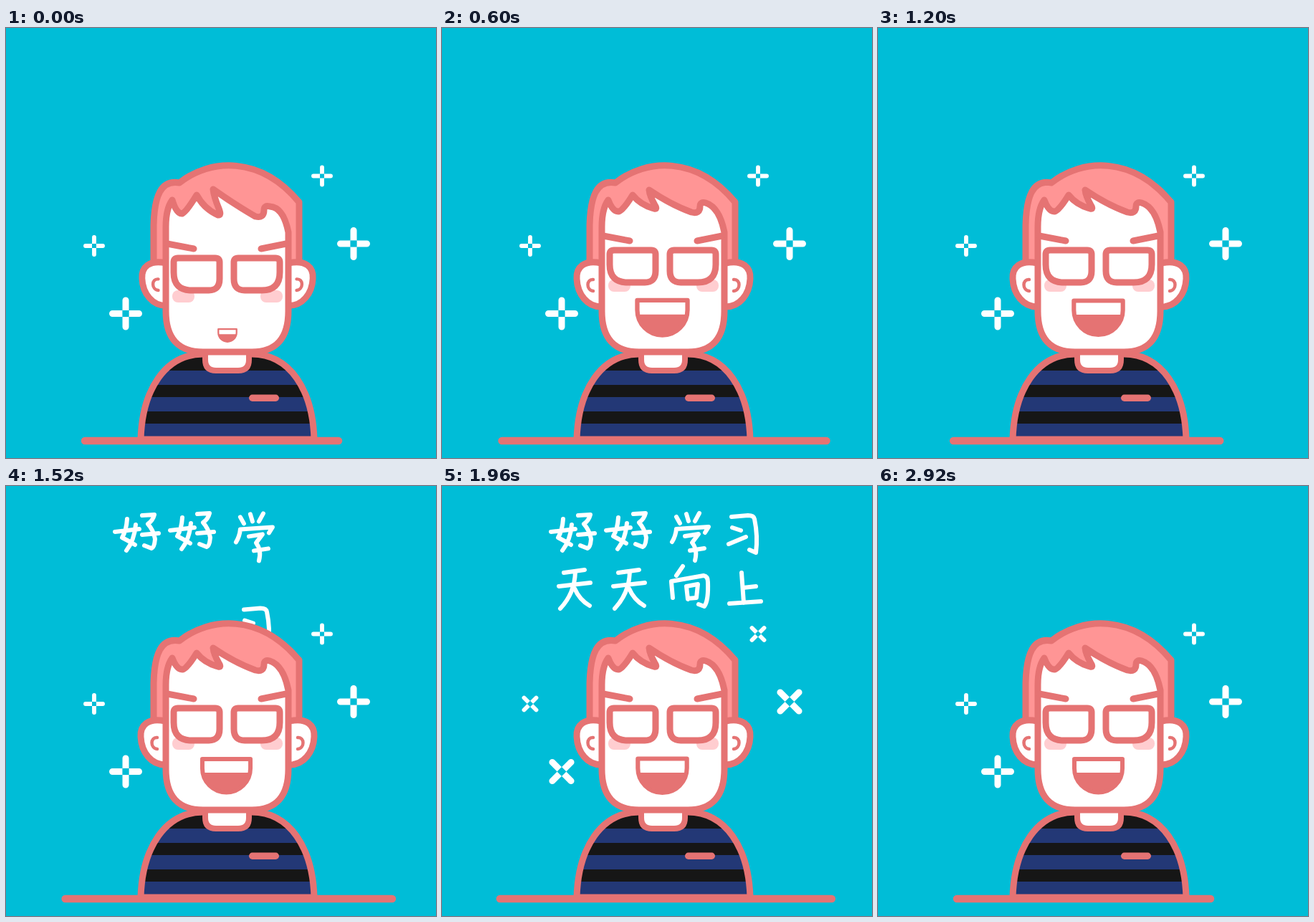
Animation, 600 px wide and 600 px high, one loop 2960 ms. Source, as an HTML page:

```html
<!DOCTYPE html>
<html lang="zh">
<head>
<meta charset="utf-8">
<title>好好学习 天天向上</title>
<style>
  html, body { margin: 0; width: 100%; height: 100%; overflow: hidden; background: #00bdd7; }
  svg { display: block; width: 100vw; height: 100vh; }
  .line { fill: none; stroke: #e57373; stroke-width: 9; stroke-linecap: round; stroke-linejoin: round; }
  .white { fill: #fff; }
  .hair { fill: #ff9595; }
  .ink { fill: none; stroke: #fff; stroke-width: 6; stroke-linecap: round; stroke-linejoin: round; }
  .ha { fill: #fff; font: 600 46px "Open Sans", sans-serif; text-anchor: middle; }
</style>
</head>
<body>
<svg viewBox="0 0 600 600">
  <defs>
    <path id="torso" d="M188 574C190 505 222 455 275 455H343C396 455 428 505 430 574Z"/>
    <clipPath id="torsoClip"><use href="#torso"/></clipPath>
    <path id="lens" d="M240 310H292Q298 310 298 316V339Q298 355 283 355H259Q234 355 234 330V316Q234 310 240 310Z"/>
    <clipPath id="lensClip"><use href="#lens"/><use href="#lens" transform="matrix(-1 0 0 1 616 0)"/></clipPath>
    <g id="spark">
      <path class="ink" style="stroke-width:9" d="M-18.5 0H18.5M0-18.5V18.5"/>
      <rect x="-4.6" y="-4.6" width="9.2" height="9.2" fill="#00bdd7"/>
    </g>
    <g id="ear">
      <path class="line white" d="M222 328C198 323 187 334 188 350C189 372 203 389 222 389"/>
      <path class="line" style="stroke-width:4.5" d="M211 351C201 350 201 366 211 367"/>
    </g>
  </defs>

  <g id="sparks"></g>
  <g id="words" role="img" aria-label="好好学习 天天向上"></g>
  <g id="laughs"></g>

  <g clip-path="url(#torsoClip)">
    <rect x="180" y="450" width="260" height="130" fill="#161616"/>
    <path fill="#233876" d="M180 478H440V498H180ZM180 515H440V535H180ZM180 552H440V580H180Z"/>
  </g>
  <use href="#torso" class="line"/>
  <rect x="339" y="511.5" width="42" height="9.5" rx="4.7" fill="#e57373"/>
  <path class="line white" style="stroke-width:8" d="M278 454V463Q278 478 293 478H324Q339 478 339 463V454"/>

  <path class="line hair" d="M206 326V275C207 235 216 211 242 216C285 182 355 178 409 243V326"/>
  <g id="ears"><use href="#ear"/><use href="#ear" transform="matrix(-1 0 0 1 618 0)"/></g>
  <path id="face" class="line white"/>
  <g id="blush" fill="#ffcdd0">
    <rect x="232" y="351" width="31" height="17" rx="8"/>
    <rect x="355" y="351" width="31" height="17" rx="8"/>
  </g>
  <g id="glasses">
    <path class="line" d="M225 290L262 297M356 297L391 290"/>
    <use href="#lens" class="white"/>
    <use href="#lens" class="white" transform="matrix(-1 0 0 1 616 0)"/>
    <path id="glare" class="line" style="stroke-width:4" clip-path="none"/>
    <use href="#lens" class="line"/>
    <use href="#lens" class="line" transform="matrix(-1 0 0 1 616 0)"/>
  </g>
  <g id="mouth">
    <path class="white" d="M274 381H341V394A33.5 33.5 0 0 1 274 394Z"/>
    <path fill="#e57373" d="M274 400H341A33.5 27.5 0 0 1 274 400Z"/>
    <path class="line" style="stroke-width:6" d="M274 381H341V394A33.5 33.5 0 0 1 274 394Z"/>
  </g>
  <path id="table" class="line" style="stroke-width:10.5"/>
</svg>
<script>
const LOOP = 2960, STEP = 40;
const $ = id => document.getElementById(id);
const set = (el, name, value) => el.setAttribute(name, value);
const move = (el, value) => set(el, 'transform', value);
const clamp = v => Math.min(1, Math.max(0, v));
const span = (t, from, to) => clamp((t - from) / (to - from));
const sine = p => (1 - Math.cos(Math.PI * p)) / 2;
const cubic = p => p < .5 ? 4 * p ** 3 : 1 - 4 * (1 - p) ** 3;

function add(parent, tag, attrs) {
  const el = document.createElementNS('http://www.w3.org/2000/svg', tag);
  for (const name in attrs) set(el, name, attrs[name]);
  return $(parent).appendChild(el);
}

// Brush strokes of each character, the centre it settles on, and an offset for repeats
const hao = 'M169 46Q168 62 162 72Q170 76 180 82M181 54Q179 76 168 90M152 64L186 60M190 41L207 40Q205 48 198 53Q206 62 208 74Q207 86 203 87L193 83M190 68L213 66';
const tian = 'M170 121L199 117M163 140L207 135M186 120Q185 150 165 171M185 143Q192 159 206 167';
const words = [
  [hao, 182, 64],
  [hao, 259, 62, 77, -2],
  ['M327 43L332 52M341 39L344 49M359 38L353 49M327 60Q326 70 321 78M327 60L372 57L367 65M339 70L358 67L349 79Q357 89 353 104M346 90L366 87', 347, 70],
  ['M404 43L427 41Q435 41 436 46Q441 70 438 93L429 89M405 58L417 62M400 81L424 71', 420, 67],
  [tian, 185, 144],
  [tian, 261, 144, 76, 0],
  ['M336 112L327 125M320 134L322 156M320 133L365 125Q371 126 371 134Q372 160 366 168L358 165M341 140L343 158M341 140L357 137L355 156L343 157', 346, 141],
  ['M418 121L421 163M420 142L438 140M401 164L445 161', 423, 142]
].map(([d, x, y, dx = 0, dy = 0]) => ({ x, y, dx, dy, el: add('words', 'path', { d, class: 'ink' }) }));

const sparks = [[441, 206.5, .65], [485, 301, 1], [123, 304, .65], [167, 398.5, 1]]
  .map(([x, y, size]) => ({ x, y, size, el: add('sparks', 'use', { href: '#spark' }) }));

// x, y, tilt, appear, start shrinking, gone
const laughs = [[191, 148, -35, 2416, 2660, 2780], [278, 105, -4, 2530, 2680, 2800], [365.5, 84, 38, 2640, 2840, 2920]]
  .map(spec => {
    const el = add('laughs', 'text', { class: 'ha', y: 16 });
    el.textContent = 'HA';
    return { spec, el };
  });

set($('glare'), 'clip-path', 'url(#lensClip)');

function tableReach(t) {
  if (t < 507) return cubic(span(t, 0, 434));
  if (t < 900) return 1 - sine(span(t, 507, 900));
  if (t < 1907) return cubic(span(t, 900, 1780));
  return 1 - sine(span(t, 1907, 2301));
}

function drawFace(t) {
  const low = 1 - sine(span(t, 0, 320));
  set($('face'), 'd', `M223 395V278Q223 252 232 240Q238 ${256 + 4 * low} 246 ${256 + 3 * low}Q252 256 266 233`
    + `Q277 ${247 + 6 * low} 296 ${252 + 9 * low}Q301 ${253 + 9 * low} 297 ${247 + 5 * low}Q290 235 289 ${226 - low}`
    + `Q320 247 348 ${257 + 6 * low}Q360 ${260 + 6 * low} 360 ${249 + 5 * low}Q360 ${242 + 5 * low} 368 ${244 + 5 * low}`
    + `Q387 250 394 285V395Q394 452 343 452H275Q223 452 223 395Z`);
  move($('glasses'), `translate(0 ${11 * low})`);
  move($('blush'), `translate(0 ${15 * low})`);
  move($('ears'), `translate(309 327) scale(${1 - .015 * low} ${1 - .025 * low}) translate(-309 -327)`);

  const pulse = t < 360 ? 0 : sine((Math.min(t, 2655) - 360) / 190);
  const size = 1 - .62 * low + .055 * pulse;
  move($('mouth'), `translate(${307.5 + 1.5 * low} ${404.5 + 24.5 * low}) scale(${size}) translate(-307.5 -404.5)`);

  const x = 215 + 103 * span(t, 680, 1080);
  set($('glare'), 'd', [x, x + 80].map(c => `M${c - 15} 354L${c + 15} 310`).join(''));
  set($('glare'), 'visibility', t > 680 && t < 1080 ? 'visible' : 'hidden');
}

function draw(t) {
  drawFace(t);

  const reach = tableReach(t);
  set($('table'), 'd', `M${110 - 30.5 * reach} 576H${464 + 83.5 * reach}`);

  const turn = 90 * (sine(span(t, 0, 558)) + sine(span(t, 1540, 2380)));
  for (const { x, y, size, el } of sparks) move(el, `translate(${x} ${y}) rotate(${turn}) scale(${size})`);

  words.forEach(({ x, y, dx, dy, el }, i) => {
    const start = 1224 + 80 * i;
    const away = 1 - sine(span(t, start, start + 140)) + sine(span(t, 2040, 2200));
    move(el, `translate(${dx + (310 - x) * away} ${dy + (265 - y) * away})`);
    set(el, 'visibility', away < 1 ? 'visible' : 'hidden');
  });

  for (const { spec: [x, y, tilt, from, fade, end], el } of laughs) {
    const size = span(t, from, from + 160) * (1 - span(t, fade, end));
    move(el, `translate(${x} ${y}) rotate(${tilt}) scale(${size})`);
    set(el, 'visibility', size > 0 ? 'visible' : 'hidden');
  }
}

const begin = performance.now();
function tick() {
  const t = (performance.now() - begin) % LOOP;
  draw(Math.floor(t / STEP) * STEP);
  requestAnimationFrame(tick);
}
tick();
</script>
</body>
</html>
```
